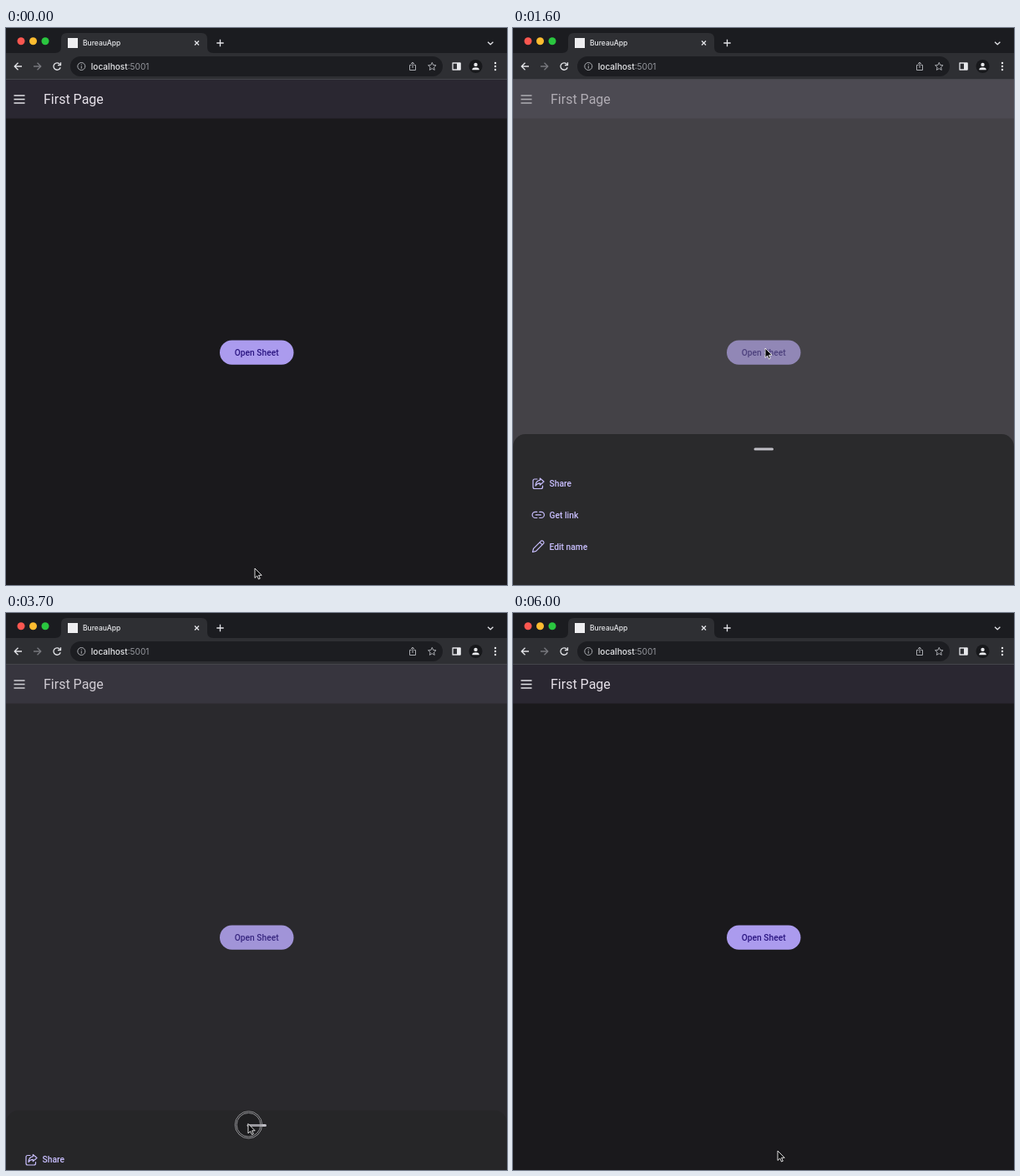
Write an HTML page that moves like this. It is 600 px wide and 668 px high and loops after 6200 ms.

```html
<!DOCTYPE html>
<html lang="en">
<head>
<meta charset="utf-8">
<title>Bottom sheet</title>
<style>
  html, body { margin: 0; width: 100%; height: 100%; overflow: hidden; background: #1a191c; }
  svg { display: block; width: 600px; height: 668px; }
  .ui { font-family: Inter, sans-serif; font-weight: 500; fill: #e8e9ec; }
  .app { font-family: Roboto, sans-serif; }
  .bold { font-size: 10.25px; font-weight: 500; }
  .line { fill: none; stroke: #e3e4e8; stroke-width: 1.3; stroke-linejoin: round; }
  .thin { stroke: #a9abb0; stroke-width: 1; }
  .item { fill: none; stroke: #c9bfff; stroke-width: 1.2; stroke-linejoin: round; stroke-linecap: round; }
</style>
</head>
<body>
<svg viewBox="0 0 600 668">
  <!-- page -->
  <g class="app">
    <rect width="600" height="668" fill="#1a191c"/>
    <rect y="61" width="600" height="47.5" fill="#2a2731"/>
    <path class="line" d="M9.5 81h13m-13 4.5h13m-13 4.5h13"/>
    <text x="45" y="91" font-size="16" fill="#e6e1e9">First Page</text>
    <rect x="256" y="374.5" width="88.5" height="29.3" rx="14.6" fill="#ab9bee"/>
    <text class="bold" x="300.2" y="392.5" text-anchor="middle" fill="#2a1581">Open Sheet</text>
  </g>
  <rect id="scrim" y="61" width="600" height="607" fill="#747277"/>

  <!-- sheet -->
  <g id="sheet" class="app">
    <rect id="panel" width="600" height="220" rx="15"/>
    <rect x="288.5" y="16.5" width="23.5" height="3" rx="1.5" fill="#bfbec5"/>
    <g class="item">
      <path d="M29 54h-3q-2 0-2 2v7.5q0 2 2 2h7.500q2 0 2-2V62"/>
      <path d="M32.300 53l4.700 4-4.700 4v-2.200q-3.500 0-5.300 3.200q.3-6.200 5.300-6.700z"/>
      <path d="M28.800 93.300h-2.100a3.600 3.600 0 0 0 0 7.200h2.100m2.900-7.200h2.100a3.600 3.600 0 0 1 0 7.200h-2.100m-4.500-3.600h6.100"/>
      <path d="M23.500 141.500l1-4.200l9.200-9.200q1.300-.8 2.600.5t.4 2.600l-9.100 9.200zm8.600-11.700l2.900 2.900"/>
    </g>
    <g class="bold" fill="#c9bfff">
      <text x="43.5" y="62.5">Share</text>
      <text x="43.5" y="100.5">Get link</text>
      <text x="43.5" y="138.5">Edit name</text>
    </g>
  </g>

  <!-- browser -->
  <g class="ui">
    <rect width="600" height="31" fill="#1b1c20"/>
    <rect y="30" width="600" height="31" fill="#2e2f33"/>
    <rect y="61" width="600" height="1" fill="#45454b"/>
    <path d="M59 30q7 0 7-7V13q0-7 7-7h161q7 0 7 7v10q0 7 7 7z" fill="#2e2f33"/>
    <circle cx="18" cy="15.700" r="4.500" fill="#fb5750"/>
    <circle cx="32.500" cy="15.700" r="4.500" fill="#fdbc30"/>
    <circle cx="47" cy="15.700" r="4.500" fill="#2ac63f"/>
    <rect x="74" y="12" width="12" height="12" fill="#eeeef0"/>
    <text x="92" y="21.200" font-size="8.5">BureauApp</text>
    <path class="line" d="M226 15.500l5 5m0-5l-5 5M252.300 18h8.400m-4.200-4.200v8.400M577 16.700l3.200 3 3.200-3"/>

    <path class="line" d="M19 46h-8.500m4-4.300L10.200 46l4.300 4.300"/>
    <path class="line" style="stroke:#77787d" d="M33 46h8.500m-4-4.300l4.300 4.300-4.300 4.300"/>
    <path class="line" d="M64.600 43.600a4.200 4.200 0 1 0 .6 3.600m.3-6v3.500H62"/>
    <rect x="77" y="34" width="446" height="24" rx="12" fill="#1c1d21"/>
    <circle class="line thin" cx="90.300" cy="46" r="4.500"/>
    <path class="line thin" d="M90.300 45.500v3.200m0-5.400v1.100"/>
    <path class="line thin" d="M485.500 44.500h-2v6h7v-6h-2M487 48v-6.700m-2.100 1.900l2.100-2.100 2.100 2.100"/>
    <path id="star" class="line thin"/>
    <text x="101.800" y="49.600" font-size="10.1">localhost<tspan fill="#96989e" font-weight="400">:5001</tspan></text>
    <rect class="line" x="535" y="42" width="9" height="8"/>
    <rect x="540" y="42" width="4.500" height="8"/>
    <circle cx="562.500" cy="46" r="8" fill="#17181b"/>
    <circle cx="562.500" cy="43.900" r="2.200"/>
    <path d="M558.300 50.300v-.8q.5-2.300 4.200-2.300t4.200 2.300v.8z"/>
    <path d="M586 42v8.100" stroke="#e8e9ec" stroke-width="2.400" stroke-linecap="round" stroke-dasharray="0 4"/>
  </g>

  <g id="cursor">
    <g id="ring" fill="#000" fill-opacity=".1" stroke="#aeaeb1" stroke-width=".8">
      <circle cx=".5" cy="1.300" r="16.200"/>
      <circle cx=".5" cy="1.300" r="14.300"/>
    </g>
    <path d="M0 0v11.500L2.700 9l1.800 4 1.800-.8-1.700-3.900h3.600z" fill="#08080a" stroke="#f4f4f4" stroke-width=".9"/>
  </g>
</svg>
<script>
const LOOP = 6200, STEP = 100, CLOSED = 668, HEIGHT = 181, DRAG = 109.5;
const LAG = 30; // the sheet trails the pointer by this many ms
const el = id => document.getElementById(id);

// Smooth progress from 0 to 1 between two times.
function ease(t, from, to) {
  const p = Math.min(1, Math.max(0, (t - from) / (to - from)));
  return p * p * (3 - 2 * p);
}

const drag = t => DRAG * (ease(t, 3020, 3700) - ease(t, 3900, 4705));
const dismiss = t => ease(t, 4800, 5500);

function draw(t) {
  const top = CLOSED - HEIGHT * (ease(t, 1314, 1600) - dismiss(t)) + drag(t);
  const open = (CLOSED - top) / HEIGHT;
  const shade = 36 + 6 * open;
  el('scrim').setAttribute('opacity', 0.47 * open);
  el('sheet').setAttribute('transform', `translate(0 ${top})`);
  el('panel').setAttribute('fill', `rgb(${shade} ${shade} ${shade + 2})`);

  const toButton = ease(t, 200, 900), toHandle = ease(t, 1700, 2600);
  const x = 298 + 4 * toButton - toHandle - 11 * ease(t, 3100, 3700)
    + 22 * ease(t, 3900, 4500) + 5 * ease(t, 4800, 6000);
  const y = 648 - 264 * toButton + 119 * toHandle + drag(t + LAG) + 142 * dismiss(t + LAG);
  el('cursor').setAttribute('transform', `translate(${x} ${y})`);
  const pressed = (t >= 1000 && t < 1300) || (t >= 2800 && t < 5400);
  el('ring').setAttribute('visibility', pressed ? 'visible' : 'hidden');
}

const corners = Array.from({ length: 10 }, (_, i) => {
  const r = i % 2 ? 2.3 : 5, a = i * Math.PI / 5;
  return `${510.3 + r * Math.sin(a)} ${46.3 - r * Math.cos(a)}`;
});
el('star').setAttribute('d', `M${corners.join('L')}Z`);

const start = performance.now();
function tick() {
  const t = (performance.now() - start) % LOOP;
  draw(Math.floor(t / STEP) * STEP);
  requestAnimationFrame(tick);
}
tick();
</script>
</body>
</html>
```
